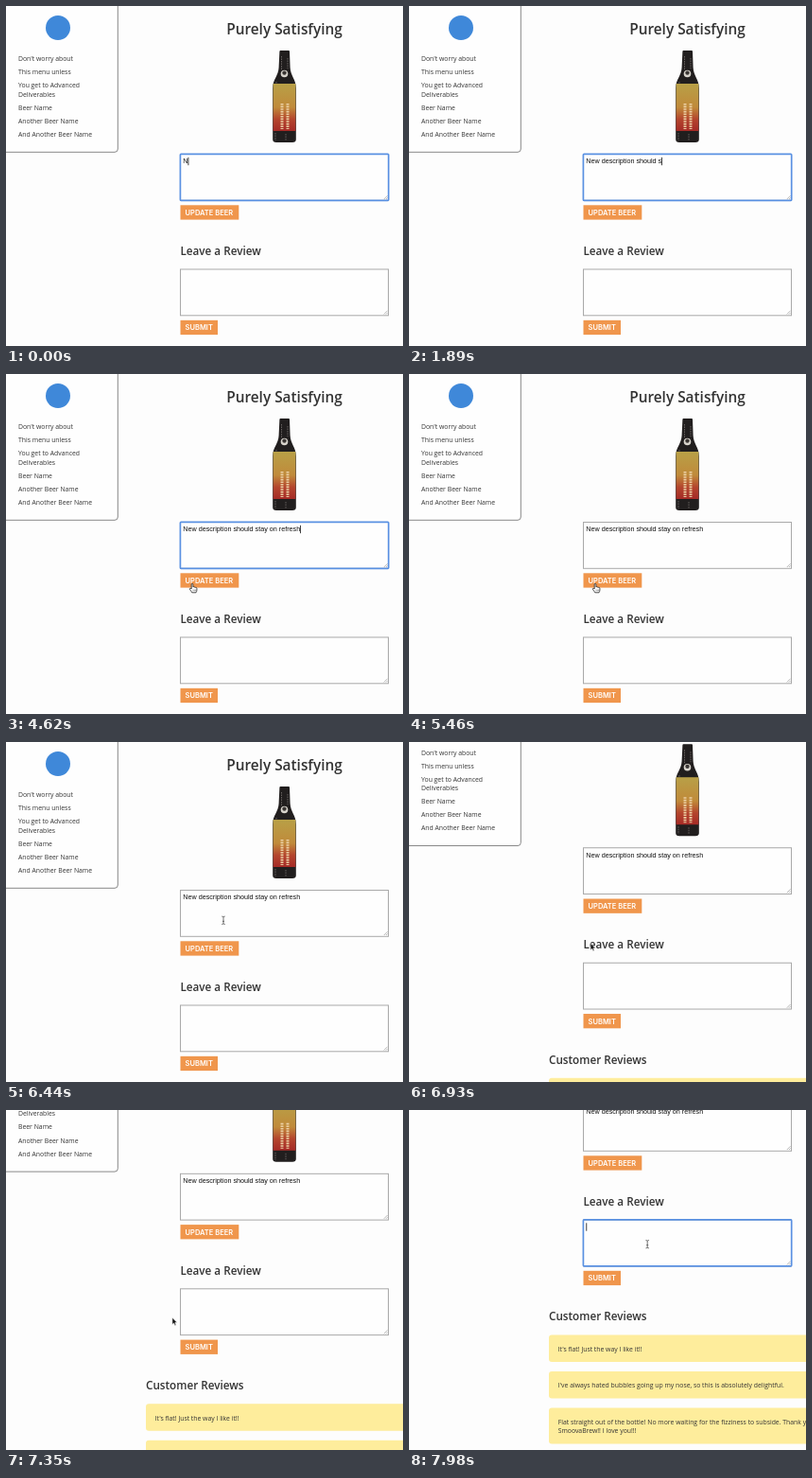
These frames come from a looping animation (420 by 359 pixels, 8 s). An HTML page:

```html
<!DOCTYPE html>
<html lang="en">
<head>
<meta charset="utf-8">
<title>Beer page</title>
<style>
  html, body { margin: 0; width: 100%; height: 100%; overflow: hidden; background: #fdfdfd; }
  svg { display: block; width: 100%; height: 100%; }
  text { font-family: "Open Sans", sans-serif; font-size: 6.85px; fill: #333; white-space: pre; }
  .title { font-size: 15.4px; font-weight: 600; text-anchor: middle; }
  .head { font-size: 11.7px; font-weight: 600; }
  .btn { font: 600 7.5px Inter, sans-serif; fill: #fff; }
  .field { font: 7.2px "Liberation Sans", Arial, sans-serif; fill: #111; }
  .ring { fill: none; stroke: #5a91e2; stroke-width: 1.7; }
</style>
</head>
<body>
<svg viewBox="0 0 420 359" preserveAspectRatio="none">
  <defs>
    <linearGradient id="label" x1="0" y1="0" x2="0" y2="1">
      <stop offset="0" stop-color="#b8a047"/>
      <stop offset=".5" stop-color="#c08a3a"/>
      <stop offset=".75" stop-color="#b4452d"/>
      <stop offset="1" stop-color="#a52a26"/>
    </linearGradient>
  </defs>
  <rect width="420" height="359" fill="#fdfdfd"/>
  <g id="page">
    <path d="M-2 -2H118.3V151Q118.3 154.3 115 154.3H-2Z" fill="#fefefe" stroke="#888"/>
    <circle cx="55" cy="23" r="13" fill="#3f88d9"/>
    <g id="menu"></g>

    <text class="title" x="294.5" y="29.8">Purely Satisfying</text>

    <g id="bottle">
      <path d="M289.4 48Q289.4 47 290.4 47H299Q300 47 300 48L300.6 65C301 74 306.8 77 306.8 87V141Q306.8 144 303 144H286Q282.2 144 282.2 141V87C282.2 77 288.2 74 288.6 65Z" fill="#211e1e"/>
      <path d="M291.5 53V67M298 55V66M286 80V84M285 134V142M296 135V142" stroke="#67615f" stroke-dasharray="1.5 1"/>
      <circle cx="294.5" cy="71.5" r="3.8" fill="#d8d4cc"/>
      <circle cx="294.5" cy="70.6" r="2.2" fill="#3a3634"/>
      <rect x="282.6" y="82" width="23.8" height="50" fill="url(#label)"/>
      <path d="M292 103V130M298 103V130" stroke="#ecd0a4" stroke-width="3" stroke-dasharray="1.6 1"/>
    </g>

    <g id="fields"></g>
    <text class="field" id="typed" x="187.3" y="166.3"></text>
    <rect id="caret" width=".8" height="8.4" fill="#111"/>

    <text class="head" x="184.5" y="263">Leave a Review</text>
    <g id="buttons"></g>
    <text class="head" x="148" y="384.3">Customer Reviews</text>
    <g id="reviews"></g>
  </g>

  <g id="arrow">
    <path d="M0 0V7.4L1.7 5.9L2.8 8.5L4.1 7.9L3 5.4H5.2Z" fill="#111" stroke="#fff" stroke-width=".6"/>
  </g>
  <g id="beam">
    <path d="M-1.7 -4.2Q0 -4.2 0 -3.2Q0 -4.2 1.7 -4.2M0 -3.2V3.2M-1.7 4.2Q0 4.2 0 3.2Q0 4.2 1.7 4.2M-1 1H1" fill="none" stroke="#444" stroke-width=".75"/>
  </g>
  <g id="hand">
    <path d="M-1 .8Q-1 0 -.2 0T.7 .8V3.6Q1.5 3 2.1 3.8Q2.9 3.3 3.5 4.2Q4.7 4 4.7 5.2V6.8Q4.7 8 3.8 9.5H-.4Q-1.2 8 -2.7 6.2Q-3.2 5.2 -2.2 4.9Q-1.5 5 -1 5.7Z" fill="#fff" stroke="#222" stroke-width=".8" stroke-linejoin="round"/>
    <path d="M.8 6.3V8M2.1 6.3V8M3.4 6.3V8" stroke="#444" stroke-width=".5"/>
  </g>
</svg>
<script>
const LOOP = 8000;
const MESSAGE = "New description should stay on refresh";
const NS = "http://www.w3.org/2000/svg";
const $ = id => document.getElementById(id);

function add(parent, tag, attrs, text) {
  const node = document.createElementNS(NS, tag);
  for (const key in attrs) node.setAttribute(key, attrs[key]);
  if (text) node.textContent = text;
  parent.appendChild(node);
  return node;
}

const show = (node, on) => node.setAttribute("visibility", on ? "visible" : "hidden");

// Static parts
[["Don't worry about", 58.3], ["This menu unless", 72.4], ["You get to Advanced", 86.4],
 ["Deliverables", 95.7], ["Beer Name", 109.7], ["Another Beer Name", 123.9],
 ["And Another Beer Name", 138]]
  .forEach(([label, y]) => add($("menu"), "text", { x: 13, y }, label));

const areas = [156.5, 278].map(y => {
  const group = $("fields");
  add(group, "rect", { x: 184.5, y, width: 220, height: 48.8, fill: "#fefefe", stroke: "#a9a9a9" });
  add(group, "path", {
    d: `M399.8 ${y + 47.5}l3.8 -3.8M402 ${y + 47.5}l1.6 -1.6`, stroke: "#888", "stroke-width": 0.6
  });
  const ring = add(group, "rect", { class: "ring", x: 184.4, y: y - 0.1, width: 220.3, height: 49, rx: 0.8 });
  return { y, ring };
});

const buttons = [["UPDATE BEER", 210.3, 61.8], ["SUBMIT", 331.8, 39.5]].map(([label, y, width]) => {
  add($("buttons"), "rect", { x: 184.5, y, width, height: 15.3, fill: "#f0964c" });
  add($("buttons"), "text", { class: "btn", x: 189.6, y: y + 10.5 }, label);
  return { y, width };
});

[[399.5, 28.5, "It's flat! Just the way I like it!!"],
 [438, 28.5, "I've always hated bubbles going up my nose, so this is absolutely delightful."],
 [476.5, 38, "Flat straight out of the bottle! No more waiting for the fizziness to subside. Thank you,",
  "SmoovaBrew!! I love you!!!"]]
  .forEach(([y, height, ...lines]) => {
    add($("reviews"), "rect", { x: 148, y, width: 293, height, rx: 3, fill: "#feed9c" });
    lines.forEach((line, i) => add($("reviews"), "text", { x: 157.7, y: y + 17.3 + i * 9.4 }, line));
  });

// Motion: each key is [time, ...values], eased between neighbours
const SCROLL = [[6680, 0], [7120, 74], [7240, 74], [7660, 162]];
const POINTER = [[4240, 236, 198], [4480, 197.2, 221.3], [5880, 197.2, 221.3], [6300, 230, 188.3],
                 [6680, 230, 188.3], [7120, 167.2, 228], [7240, 167.2, 228], [7800, 252.2, 141.7]];
const BLUR = 4760, REFOCUS = 7850, TYPED = 3280;

function sample(keys, t) {
  if (t <= keys[0][0]) return keys[0].slice(1);
  const i = keys.findIndex(key => key[0] > t);
  if (i < 0) return keys[keys.length - 1].slice(1);
  const a = keys[i - 1], b = keys[i];
  const u = (t - a[0]) / (b[0] - a[0]);
  const k = u * u * (3 - 2 * u);
  return a.slice(1).map((v, j) => v + (b[j + 1] - v) * k);
}

function typedCount(t) {
  const n = t < 1890 ? 1 + t / 82 : 24 + (t - 1890) / 98;
  return Math.min(MESSAGE.length, Math.floor(n));
}

function pointerKind(x, y) {
  if (buttons.some(b => x > 184 && x < 184.5 + b.width && y > b.y && y < b.y + 15.3)) return "hand";
  if (areas.some(a => x > 184 && x < 405 && y > a.y && y < a.y + 49)) return "beam";
  return "arrow";
}

function draw(t) {
  const [scroll] = sample(SCROLL, t);
  $("page").setAttribute("transform", `translate(0 ${-scroll})`);

  const typed = $("typed");
  typed.textContent = MESSAGE.slice(0, typedCount(t));

  const first = t < BLUR, second = t >= REFOCUS;
  show(areas[0].ring, first);
  show(areas[1].ring, second);

  const blinkOn = t < TYPED || (t - TYPED) % 1000 < 500;
  const caret = $("caret");
  show(caret, second || (first && blinkOn));
  caret.setAttribute("x", second ? 187.4 : 187.3 + typed.getComputedTextLength());
  caret.setAttribute("y", second ? 281.3 : 159.8);

  const [x, y] = sample(POINTER, t);
  const kind = t < POINTER[0][0] ? "" : pointerKind(x, y + scroll);
  for (const id of ["arrow", "beam", "hand"]) {
    show($(id), id === kind);
    $(id).setAttribute("transform", `translate(${x} ${y})`);
  }
}

const start = performance.now();
function tick() {
  draw((performance.now() - start) % LOOP);
  requestAnimationFrame(tick);
}
tick();
</script>
</body>
</html>
```
